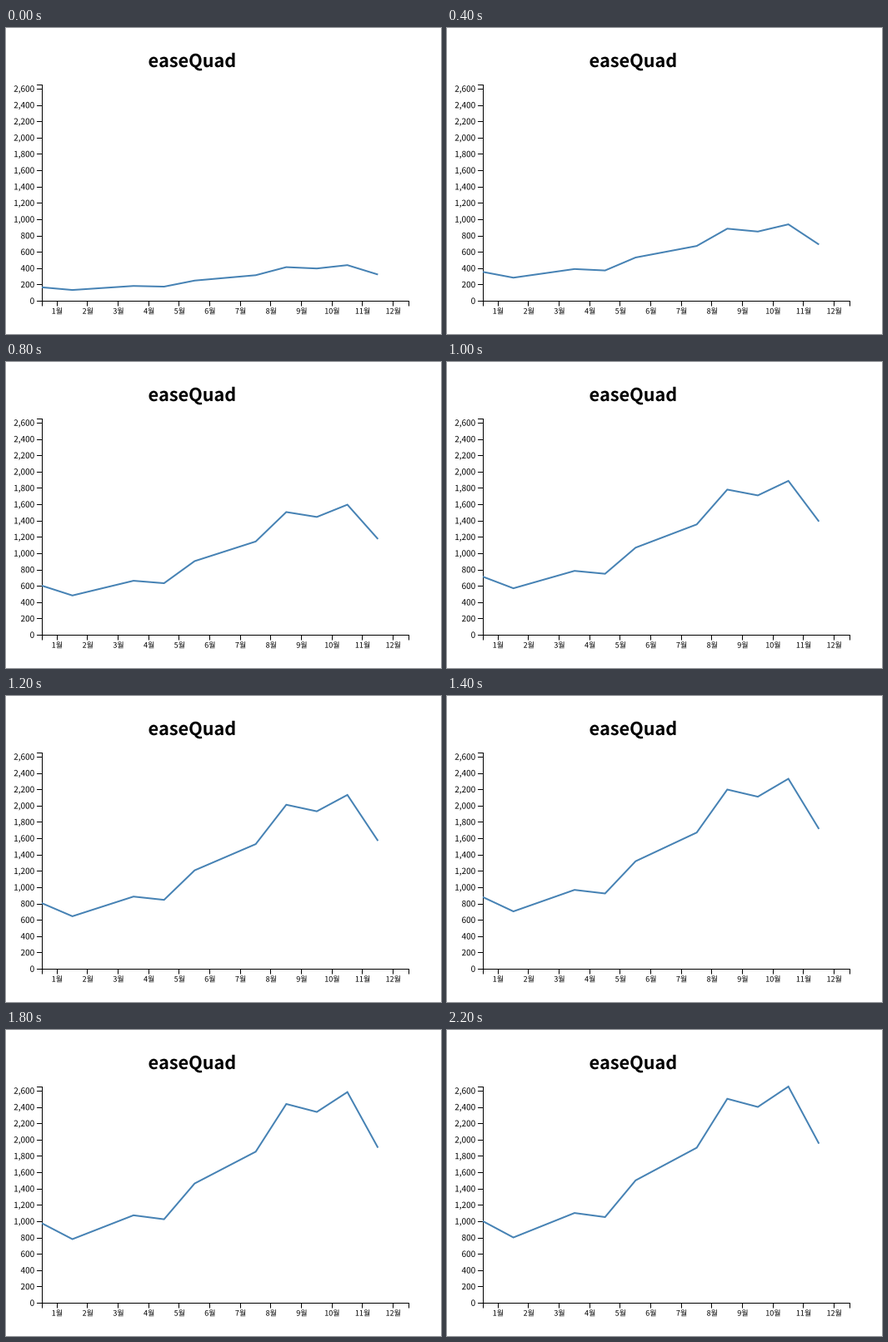
A matplotlib script for the animation above (5300 ms loop, 522 by 368 pixels).

```python
import math

import matplotlib.pyplot as plt
from matplotlib.animation import FuncAnimation
from matplotlib.patches import PathPatch
from matplotlib.path import Path
from matplotlib.textpath import TextPath

W, H, DPI = 522, 368, 100
PX = 72 / DPI
LEFT, BOTTOM, PLOT_W, PLOT_H = 43, 328, 440, 260
BAND = PLOT_W / 12
Y_MAX = 2650
SALES = [1000, 800, 950, 1100, 1050, 1500, 1700, 1900, 2500, 2400, 2650, 1950]

FRAMES, INTERVAL, DURATION = 53, 100, 3000
START = 0.287  # progress already made when the loop begins

fig = plt.figure(figsize=(W / DPI, H / DPI), dpi=DPI, facecolor="white")
ax = fig.add_axes([0, 0, 1, 1])
ax.set_xlim(0, W)
ax.set_ylim(H, 0)
ax.axis("off")


def stroke(xs, ys, color="black", width=1, z=2):
    return ax.plot(xs, ys, color=color, lw=width * PX, zorder=z, snap=False,
                   solid_capstyle="butt", solid_joinstyle="miter")[0]


def label(x, y, text, size, anchor=0.5, weight="light"):
    """Place text as outlines so that it can sit between whole pixels."""
    font = {"family": "Noto Sans CJK JP", "weight": weight}
    glyphs = TextPath((0, 0), text, size=size, prop=font)
    box = glyphs.get_extents()
    shift = x - box.x0 - anchor * box.width
    points = glyphs.vertices * [1, -1] + [shift, y]
    ax.add_patch(PathPatch(Path(points, glyphs.codes), fc="black", lw=0,
                           snap=False))


def y_pos(value):
    return BOTTOM - PLOT_H * value / Y_MAX


def ease_quad(t):
    t = min(t, 1)
    return 2 * t * t if t < 0.5 else 1 - 2 * (1 - t) ** 2


def draw_axes():
    x0, x1 = LEFT + 0.5, LEFT + PLOT_W + 0.5
    y0, y1 = BOTTOM + 0.5, BOTTOM - PLOT_H + 0.5
    stroke([x0, x0], [y1 - 0.5, y0 + 0.5])
    stroke([x0 - 0.5, x1 + 0.5], [y0, y0])
    stroke([x0 - 6.5, x0], [y1, y1])
    for x in (x0, x1):
        stroke([x, x], [y0, y0 + 6])
    for value in range(0, 2601, 200):
        y = math.floor(y_pos(value) + 0.5) + 0.5
        stroke([x0 - 6.5, x0], [y, y])
        label(33.7, y_pos(value) + 3.8, f"{value:,}", 10, anchor=1)
    for i in range(12):
        x = LEFT + BAND * (i + 0.5)
        tick = math.floor(x - 0.01) + 0.5
        stroke([tick, tick], [y0, y0 + 6])
        label(x, 343.6, f"{i + 1}월", 9)


draw_axes()
label(223, 47, "easeQuad", 21.6, weight="bold")
xs = [LEFT + BAND * i for i in range(12)]
line = stroke(xs, [BOTTOM] * 12, "steelblue", 2, z=3)


def update(frame):
    k = ease_quad(START + frame * INTERVAL / DURATION)
    line.set_ydata([y_pos(v * k) for v in SALES])
    return (line,)


anim = FuncAnimation(fig, update, frames=FRAMES, interval=INTERVAL,
                     init_func=lambda: update(0), repeat=True, repeat_delay=0)
plt.show()
```
